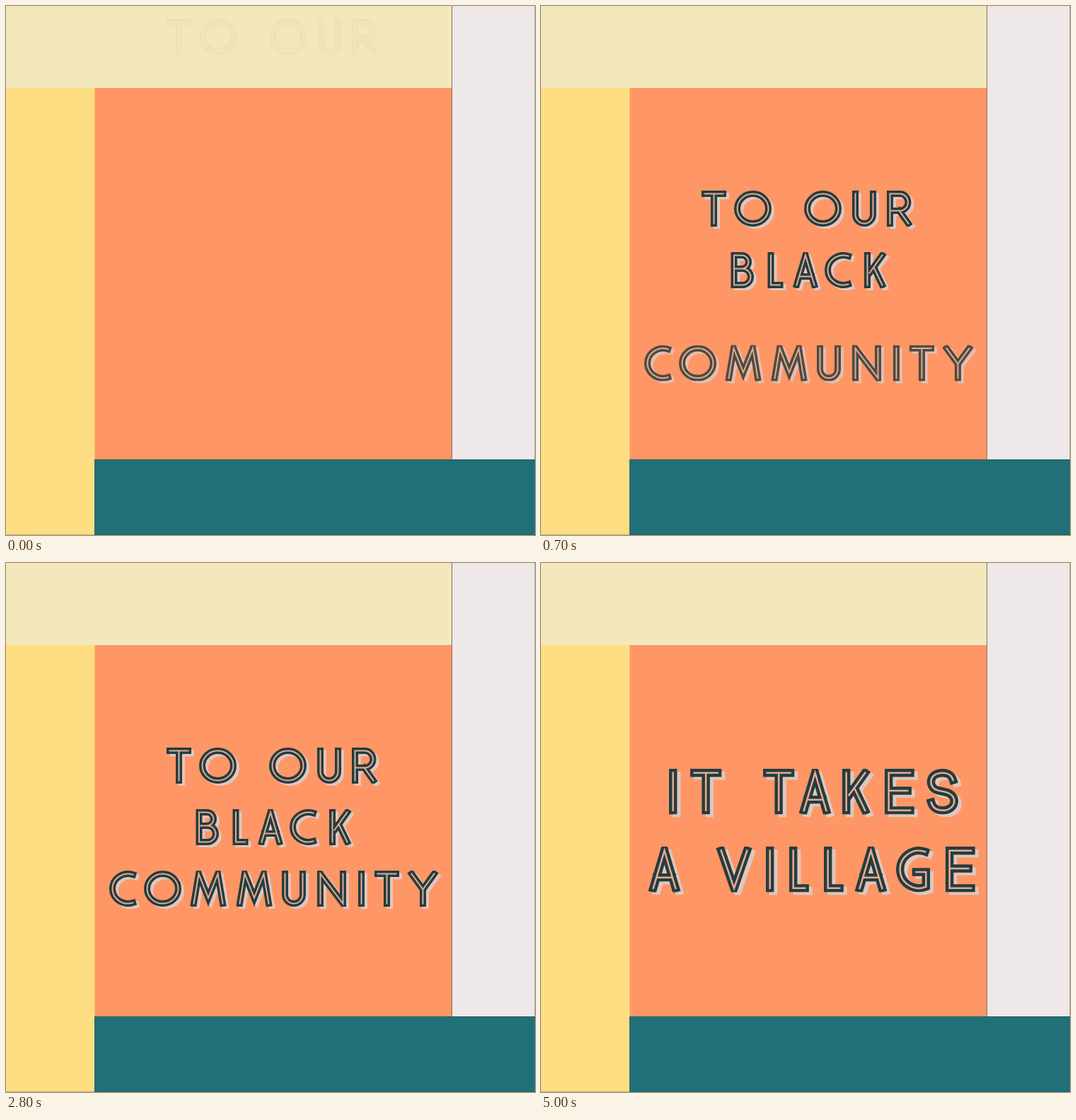
An HTML page that plays this animation: 748 by 748 pixels, repeating every 7 s.

```html
<!DOCTYPE html>
<html lang="en">
<head>
<meta charset="utf-8">
<title>It takes a village</title>
<style>
  html, body { margin: 0; width: 100%; height: 100%; overflow: hidden; }
  svg { display: block; width: 100%; height: 100%; }
  .glyph path { fill: none; stroke-linecap: square; stroke-miterlimit: 10; }
  .shadow { stroke: #dfc6be; stroke-width: 9; }
  .ink { stroke: #233d40; stroke-width: 9; }
  .inline { stroke: #e9aa8e; stroke-width: 2; }
</style>
</head>
<body>
<svg viewBox="0 0 748 748" role="img" aria-label="To our Black community: it takes a village">
  <clipPath id="cap"><rect x="-20" y="-4.5" width="100" height="51"/></clipPath>
  <rect width="748" height="748" fill="#f3e8bc"/>
  <rect y="116" width="126" height="632" fill="#fede83"/>
  <rect x="125.5" y="116" width="505" height="526" fill="#ff9665"/>
  <rect x="630" width="118" height="642" fill="#efe8e8"/>
  <rect x="125" y="641" width="623" height="107" fill="#217077"/>
  <path d="M630.5 0V641" stroke="#8a6a5c"/>
  <path d="M747.5 0V641" stroke="#bdb6b6"/>
  <path d="M125 641.5H748M125.5 641V748" stroke="#2b6567"/>
  <path d="M0 747.5H125" stroke="#c9b577"/>
  <path d="M125 747.5H748" stroke="#1d5f66"/>
  <g id="words"></g>
</svg>
<script>
// Centre lines of the letters; cap height 42, left edge at 0.
const GLYPHS = {
  A: 'M0 42L12.5 0L25 42M4 30H21',
  B: 'M11 19H12A11.5 11.5 0 0 1 12 42H0V0H11A9.5 9.5 0 0 1 11 19H0',
  C: 'M29 1.1A22 21 0 1 0 29 40.9',
  E: 'M24 0H0V42H24M0 20H21',
  G: 'M28 1.2A21 21 0 1 0 29 40.4V24H18',
  I: 'M0 0V42',
  K: 'M0 0V42M21 0L3 25M9 17L21 42',
  L: 'M0 0V42H13',
  M: 'M0 42L7 0L20.5 34L34 0L41 42',
  N: 'M0 42V0L32 42V0',
  O: 'M22 0A22 21 0 1 0 22 42A22 21 0 1 0 22 0Z',
  R: 'M0 42V0H14A11.5 12 0 0 1 14 24H0M13 24L26 42',
  S: 'M24.5 8C23 3 18.5 0 13 0C-4 0 -3 17 7 19.5L16 21.5C31 25 28 42 12.5 42C6 42 1.5 38.5 0 33',
  T: 'M0 0H26M13 0V42',
  U: 'M0 0V29.5A12.5 12.5 0 0 0 25 29.5V0',
  V: 'M0 0L14.5 42L29 0',
  Y: 'M0 0L16 22L32 0M16 22V42'
};

const LOOP = 7000, STEP = 100, CUT = 2900;
const SLIDE = 250, ENTER = 400;

// Words of the first card slide in; words of the second pop in.
const sliding = [
  { text: 'TOOUR', xs: [227, 273, 372, 440, 489], y: 261, from: [0, -1], start: -18 },
  { text: 'BLACK', xs: [268.5, 320.5, 357, 401, 457], y: 348, from: [1, 0], start: 260 },
  { text: 'COMMUNITY', xs: [146, 195, 261, 326, 390, 440, 498, 521, 569], y: 435, from: [0, 1], start: 492 }
];
const popping = [
  { text: 'IT', xs: [181, 211], y: 291, start: 3200 },
  { text: 'TAKES', xs: [314, 366, 426, 486, 546], y: 291, start: 3500 },
  { text: 'A', xs: [153], y: 401, start: 3800 },
  { text: 'VILLAGE', xs: [249, 318, 351, 400, 445, 502, 572], y: 401, start: 4100 }
];

function glyph(char, x, y, scale) {
  const d = GLYPHS[char], inset = 4.5 * scale;
  return `<g class="glyph" transform="translate(${x + inset} ${y + inset}) scale(${scale})">
    <path class="shadow" d="${d}" transform="translate(4 3.2)" clip-path="url(#cap)"/>
    <path class="ink" d="${d}" clip-path="url(#cap)"/>
    <path class="inline" d="${d}"/></g>`;
}

function addWord(word, scale) {
  word.node = document.createElementNS('http://www.w3.org/2000/svg', 'g');
  word.node.innerHTML = [...word.text].map((c, i) => glyph(c, word.xs[i], word.y, scale)).join('');
  document.getElementById('words').append(word.node);
}
sliding.forEach(w => addWord(w, 1));
popping.forEach(w => addWord(w, 1.265));

// cubic-bezier(.25, .1, .25, 1), solved by bisection
function ease(p) {
  if (p <= 0) return 0;
  if (p >= 1) return 1;
  const curve = (a, b, u) => 3 * a * u * (1 - u) ** 2 + 3 * b * u * u * (1 - u) + u ** 3;
  let lo = 0, hi = 1;
  for (let i = 0; i < 24; i++) {
    const mid = (lo + hi) / 2;
    if (curve(.25, .25, mid) < p) lo = mid; else hi = mid;
  }
  return curve(.1, 1, lo);
}

function draw(time) {
  const t = Math.floor((time % LOOP) / STEP) * STEP;
  for (const { node, from, start } of sliding) {
    const e = ease((t - start) / ENTER), off = SLIDE * (1 - e);
    node.setAttribute('transform', `translate(${from[0] * off} ${from[1] * off})`);
    node.setAttribute('opacity', t < CUT ? e : 0);
  }
  for (const { node, start } of popping) node.setAttribute('opacity', t >= start ? 1 : 0);
}

const begin = performance.now();
function tick() {
  draw(performance.now() - begin);
  requestAnimationFrame(tick);
}
tick();
</script>
</body>
</html>
```
